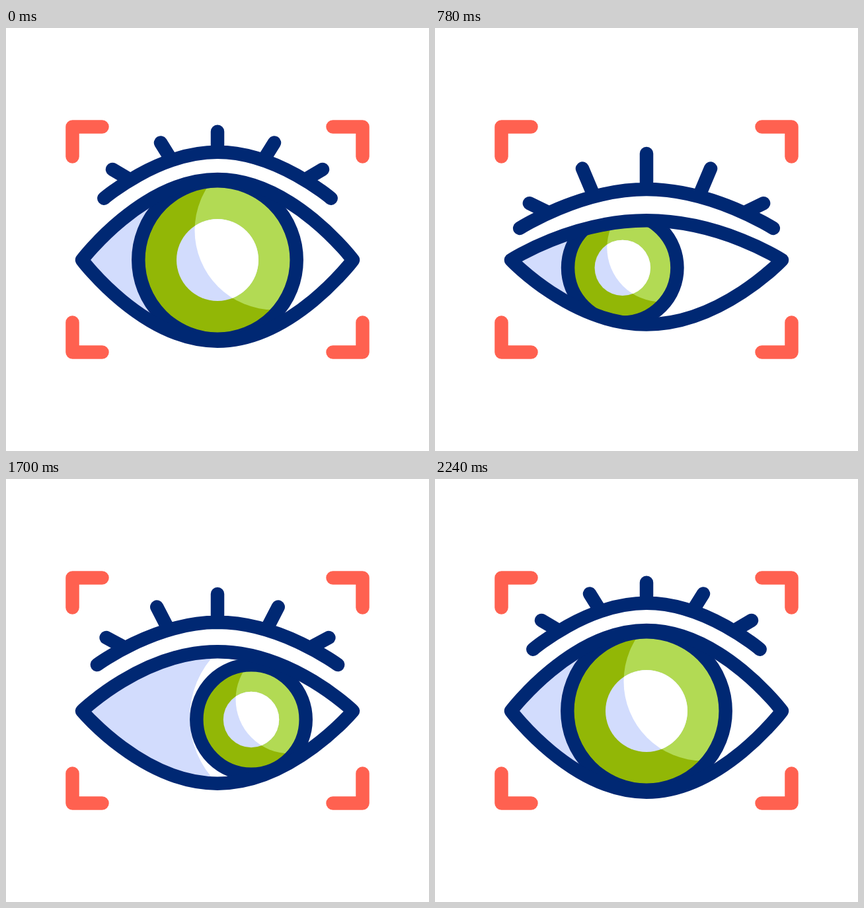
These frames come from a looping animation (640x640 px, 2400 ms). An HTML page:

```html
<!DOCTYPE html>
<html lang="en">
<head>
<meta charset="utf-8">
<title>Eye tracking</title>
<style>
  html, body { margin: 0; width: 100%; height: 100%; overflow: hidden; background: #fff; }
  svg { display: block; width: 100vw; height: 100vh; }
  .line { fill: none; stroke: #002873; stroke-width: 20.5; stroke-linecap: round; stroke-linejoin: round; }
  .frame { stroke: #ff6150; }
</style>
</head>
<body>
<svg viewBox="0 0 640 640">
  <defs>
    <clipPath id="eyeClip"><path id="eyeMask"/></clipPath>
    <clipPath id="irisClip"><circle id="irisMask"/></clipPath>
    <clipPath id="pupilClip"><circle id="pupilMask"/></clipPath>
  </defs>
  <path id="corners" class="line frame"/>
  <g clip-path="url(#eyeClip)">
    <path id="shade" fill="#d2dcfd"/>
    <circle id="iris" fill="#92b706"/>
    <g clip-path="url(#irisClip)"><circle id="irisLight" fill="#b2da54"/></g>
    <circle id="pupil" fill="#d2dcfd"/>
    <g clip-path="url(#pupilClip)"><circle id="pupilLight" fill="#fff"/></g>
    <circle id="ring" class="line"/>
  </g>
  <path id="lid" class="line"/>
  <path id="brow" class="line"/>
</svg>
<script>
const LOOP = 2400, MID = 320;
const $ = id => document.getElementById(id);
const path = (id, d) => $(id).setAttribute("d", d);

// Smooth 0 to 1 between two times
function ease(t, from, to) {
  const k = Math.min(1, Math.max(0, (t - from) / (to - from)));
  return k * k * (3 - 2 * k);
}

// Up in 160 ms, then down again
function pulse(t, at, back) {
  const peak = at + 160;
  return ease(t, at, peak) - ease(t, peak, peak + back);
}

function circle(ids, cx, cy, r) {
  for (const id of ids) {
    const el = $(id);
    el.setAttribute("cx", cx);
    el.setAttribute("cy", cy);
    el.setAttribute("r", r);
  }
}

function drawCorners(scale) {
  const w = 219.5, h = 170.5, arm = 45;
  let d = "";
  for (const sx of [-scale, scale]) for (const sy of [-scale, scale]) {
    const p = (x, y) => `${MID + sx * x} ${MID + sy * y}`;
    d += `M${p(w - arm, h)}L${p(w, h)}L${p(w, h - arm)}`;
  }
  path("corners", d);
}

// c is how far the lids are lowered
function drawEye(c) {
  const top = 229 + 62 * c, low = 473.7 - 25 * c;
  const half = y => `C115 351 207 ${y} ${MID} ${y}S525 351 525 351`;
  const eye = `M115 351${half(top)}M115 351${half(low)}`;
  const closed = `M115 351${half(top)}C525 351 433 ${low} ${MID} ${low}S115 351 115 351Z`;
  path("eyeMask", closed);
  path("lid", eye);

  const h = (low - top) / 2, sag = 42;
  const r = (h * h + sag * sag) / (2 * sag);
  path("shade", `M90 ${top}H${MID}A${r} ${r} 0 0 0 ${MID} ${low}H90Z`);
}

function drawBrow(c) {
  const x = 148.3 - 20 * c, y = 257.7 + 45 * c, mid = 187.7 + 56 * c;
  let d = `M${x} ${y}C${x} ${y} ${230 - 10 * c} ${mid} ${MID} ${mid}` +
    `S${640 - x} ${y} ${640 - x} ${y}`;
  // Lash tips sit on a parabola and fan outwards
  for (let i = 0; i < 3; i++) {
    const dx = (92.5 + 13 * c) * i - (6.5 + 2 * c) * i * i;
    const tip = 156.8 + 33 * c + (0.00226 + 0.00014 * c) * dx * dx;
    const turn = ((34.3 - 20.3 * c) * i + (11.3 * c - 2.3) * i * i) * Math.PI / 180;
    const len = 31 + 23 * c - (3 + 10 * c) * i;
    const rootX = dx - len * Math.sin(turn), rootY = tip + len * Math.cos(turn);
    for (const s of [-1, 1]) d += `M${MID + s * dx} ${tip}L${MID + s * rootX} ${rootY}`;
  }
  path("brow", d);
}

function drawIris(x, y, r, pupil) {
  const k = pupil / 62;
  circle(["iris", "irisMask", "ring"], x, y, r);
  circle(["pupil", "pupilMask"], x, y, pupil);
  circle(["irisLight", "pupilLight"], x + 86 * k, y - 45 * k, 120.5 * k);
}

function render(t) {
  const home = ease(t, 1736, 2240);
  const left = ease(t, 520, 925), right = ease(t, 925, 1440);
  const drop = ease(t, 520, 840) - home;
  const shrink = ease(t, 200, 595) - home;
  const narrow = ease(t, 200, 645) - home;
  const lids = 1.6 * ease(t, 520, 965) - 1.08 * ease(t, 965, 1440) - 0.52 * ease(t, 1900, 2240);

  drawCorners(1 + 0.19 * (pulse(t, 420, 160) + pulse(t, 1820, 240)));
  drawEye(lids);
  drawBrow(lids);
  drawIris(MID + 51 * (2 * right - left - home), 351 + 13 * drop,
    119.7 - 37 * shrink, 62 - 19.8 * narrow);
}

const start = performance.now();
function tick(now) {
  render(Math.max(0, now - start) % LOOP);
  requestAnimationFrame(tick);
}
render(0);
requestAnimationFrame(tick);
</script>
</body>
</html>
```
